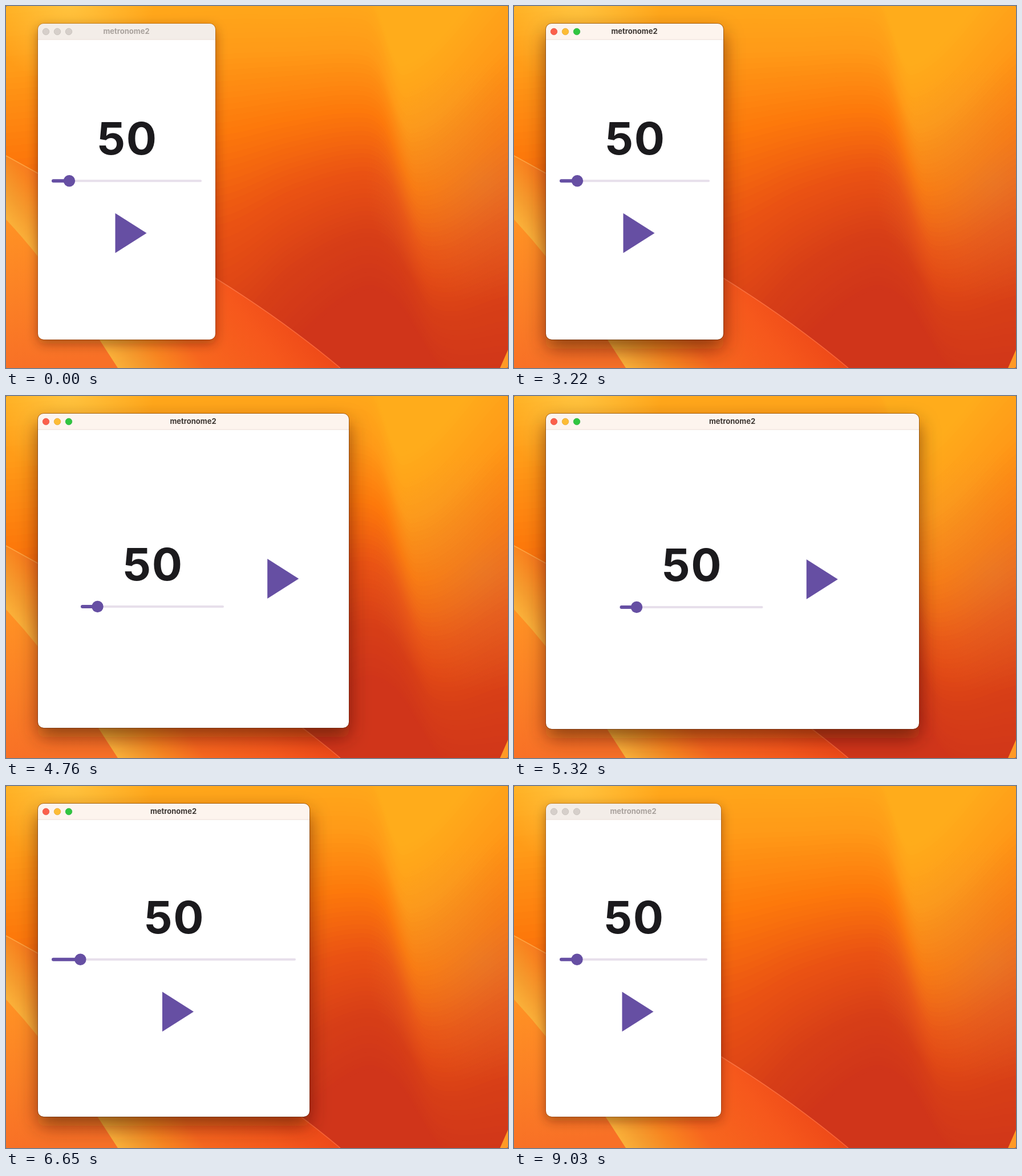
These frames come from a looping animation (880 by 636 pixels, 9.1 s). An HTML page:

```html
<!DOCTYPE html>
<html lang="en">
<head>
<meta charset="utf-8">
<title>metronome2</title>
<style>
  html, body { margin: 0; width: 100%; height: 100%; overflow: hidden; background: #7a3c14; }
  svg { display: block; width: 880px; height: 636px; }
  text { font-family: Inter, "Liberation Sans", sans-serif; font-weight: 700; text-anchor: middle; font-optical-sizing: none; }
</style>
</head>
<body>
<svg viewBox="0 0 880 636">
  <defs>
    <clipPath id="screen"><rect width="880" height="636" rx="3"/></clipPath>
    <linearGradient id="sheet" gradientUnits="userSpaceOnUse" x1="0" y1="375" x2="250" y2="188">
      <stop offset="0" stop-color="#fab13a"/>
      <stop offset=".1" stop-color="#f59c2e"/>
      <stop offset=".22" stop-color="#f88520"/>
      <stop offset=".4" stop-color="#f7661e"/>
      <stop offset=".74" stop-color="#f6581c"/>
      <stop offset="1" stop-color="#ee4918"/>
    </linearGradient>
    <linearGradient id="fold" gradientUnits="userSpaceOnUse" x1="0" y1="380" x2="40" y2="636">
      <stop offset="0" stop-color="#ff9224"/>
      <stop offset="1" stop-color="#f87026"/>
    </linearGradient>
    <linearGradient id="rim" gradientUnits="userSpaceOnUse" x1="0" y1="0" x2="586" y2="0">
      <stop offset="0" stop-color="#ffb04a"/>
      <stop offset=".65" stop-color="#ff7a48"/>
      <stop offset="1" stop-color="#ff6a3c"/>
    </linearGradient>
    <radialGradient id="glow" gradientUnits="userSpaceOnUse" cx="110" cy="-10" r="150">
      <stop offset="0" stop-color="#ffd050" stop-opacity=".7"/>
      <stop offset="1" stop-color="#ffd050" stop-opacity="0"/>
    </radialGradient>
    <radialGradient id="haze" gradientUnits="userSpaceOnUse" cx="840" cy="310" r="210">
      <stop offset="0" stop-color="#d8904c" stop-opacity=".34"/>
      <stop offset="1" stop-color="#d8904c" stop-opacity="0"/>
    </radialGradient>
    <filter id="wideBlur" filterUnits="userSpaceOnUse" x="-80" y="-80" width="1040" height="800">
      <feGaussianBlur stdDeviation="17"/>
    </filter>
    <filter id="tightBlur" filterUnits="userSpaceOnUse" x="-80" y="-80" width="1040" height="800">
      <feGaussianBlur stdDeviation="10"/>
    </filter>
  </defs>
  <g clip-path="url(#screen)">
    <rect width="880" height="636" fill="#ffac1b"/>
    <g id="dunes"></g>
    <rect width="880" height="636" fill="url(#haze)"/>
    <rect width="880" height="300" fill="url(#glow)"/>
    <path d="M0 263L56 294Q230 388 367 478Q490 555 586 636H0Z" fill="url(#sheet)"/>
    <path d="M0 263L56 294Q230 388 367 478Q490 555 586 636" fill="none" stroke="url(#rim)" stroke-width="1.6" stroke-opacity=".8"/>
    <path d="M0 375Q29 406 56 440Q120 520 165 588L196 636H0Z" fill="url(#fold)"/>
    <path d="M866 636Q873 620 880 604V636Z" fill="#ff9a26"/>

    <rect id="wideShadow" x="56" y="47" rx="10" fill="#3a1400" fill-opacity=".56" filter="url(#wideBlur)"/>
    <rect id="tightShadow" x="56" y="38" rx="10" fill="#3a1400" fill-opacity=".42" filter="url(#tightBlur)"/>
    <rect id="panel" x="56" y="31" rx="10" fill="#fff"/>
    <path id="bar"/>
    <path id="divider" stroke="#ebddd6"/>
    <rect id="outline" x="55.5" y="30.5" rx="10.5" fill="none" stroke="#5a2a10"/>
    <g id="lights" stroke-width=".7">
      <circle cx="70" cy="45" r="5.75"/>
      <circle cx="90" cy="45" r="5.75"/>
      <circle cx="110" cy="45" r="5.75"/>
    </g>
    <text id="title" y="49" font-size="13">metronome2</text>

    <text id="tempo" font-size="79" letter-spacing="1.5" fill="#1b1a1d">50</text>
    <path id="track" stroke="#e7dfeb" stroke-width="4" stroke-linecap="round"/>
    <path id="filled" stroke="#664fa3" stroke-width="6" stroke-linecap="round"/>
    <circle id="thumb" r="10.2" fill="#664fa3"/>
    <path id="play" d="M-20-35V35L35 0Z" fill="#664fa3"/>
  </g>
</svg>
<script>
const LOOP = 9100, STEP = 70;
const LEFT = 56, TOP = 31, CONTENT_TOP = 59;
const FOCUS_ON = 3220, FOCUS_OFF = 8680;
const $ = id => document.getElementById(id);
const mix = (a, b, k) => a + (b - a) * k;

function set(id, attrs) {
  for (const name in attrs) $(id).setAttribute(name, attrs[name]);
}

// Hermite segments through the points, closed below the stage.
function smoothPath(points) {
  const last = points.length - 1;
  const slope = i => {
    const a = points[Math.max(i - 1, 0)], b = points[Math.min(i + 1, last)];
    return (b[1] - a[1]) / (b[0] - a[0]);
  };
  let d = `M${points[0]}`;
  for (let i = 0; i < last; i++) {
    const [x0, y0] = points[i], [x1, y1] = points[i + 1], h = (x1 - x0) / 3;
    d += `C${x0 + h} ${y0 + h * slope(i)} ${x1 - h} ${y1 - h * slope(i + 1)} ${x1} ${y1}`;
  }
  return d + "V900H0Z";
}

// One wallpaper contour: a hill cresting at height p, a steep drop, a valley, a rise.
function contour(p) {
  const sag = p * p / 1000;
  return [
    [0, p + 30 + 1.5 * sag],
    [380, p + 1.1 * sag],
    [500, p + 0.4 * sag],
    [620, p],
    [645 + 0.08 * p, p + 20],
    [700 + 0.13 * p, p + 138],
    [880, 1.4 * p - 40]
  ];
}

function paintDunes() {
  const ramp = ["ffac1b", "ff9b18", "fd790b", "ea5213", "d73e17", "cf341a"]
    .map(hex => hex.match(/../g).map(c => parseInt(c, 16)));
  const CREST = -40, SPACING = 110, BANDS = 14;
  let markup = "";
  for (let i = 0; i < (ramp.length - 1) * BANDS; i++) {
    const n = Math.floor(i / BANDS), k = i / BANDS - n;
    const color = ramp[n].map((c, j) => Math.round(mix(c, ramp[n + 1][j], k)));
    markup += `<path fill="rgb(${color})" d="${smoothPath(contour(CREST + SPACING * (n + k)))}"/>`;
  }
  $("dunes").innerHTML = markup;
}

// Window drag: time, right edge, bottom edge.
const drag = [
  [3430, 367, 586], [3990, 506, 585], [4760, 601, 583], [5635, 742, 586],
  [6090, 690, 588], [7210, 392, 573], [7700, 363, 581]
];

// Monotone cubic interpolation of one column of the drag path.
function dragValue(t, col) {
  const last = drag.length - 1;
  if (t <= drag[0][0]) return drag[0][col];
  if (t >= drag[last][0]) return drag[last][col];
  const rate = i => (drag[i + 1][col] - drag[i][col]) / (drag[i + 1][0] - drag[i][0]);
  const tangent = i => {
    if (i === 0 || i === last) return 0;
    const a = rate(i - 1), b = rate(i);
    return a * b > 0 ? 2 * a * b / (a + b) : 0;
  };
  let i = 0;
  while (t >= drag[i + 1][0]) i++;
  const h = drag[i + 1][0] - drag[i][0];
  const u = (t - drag[i][0]) / h, v = 1 - u;
  return drag[i][col] * (1 + 2 * u) * v * v + h * tangent(i) * u * v * v
    + drag[i + 1][col] * u * u * (3 - 2 * u) - h * tangent(i + 1) * u * u * v;
}

function drawChrome(right, bottom, active) {
  const width = right - LEFT, height = bottom - TOP;
  set("wideShadow", { width, height, visibility: active ? "visible" : "hidden" });
  set("tightShadow", { width, height, visibility: active ? "hidden" : "visible" });
  set("panel", { width, height });
  set("outline", { width: width + 1, height: height + 1, "stroke-opacity": active ? .5 : .3 });
  set("bar", {
    d: `M${LEFT} 59V41a10 10 0 0 1 10-10H${right - 10}a10 10 0 0 1 10 10V59Z`,
    fill: active ? "#fdf4ee" : "#f3ede8"
  });
  set("divider", { d: `M${LEFT} 59H${right}` });
  set("title", { x: (LEFT + right) / 2 - .5, fill: active ? "#3d3733" : "#a8a19c" });
  const colors = ["#fb5f4b", "#fdbc35", "#2fc640"], rims = ["#e2503f", "#e0a32c", "#27ad35"];
  [...$("lights").children].forEach((light, i) => {
    light.setAttribute("fill", active ? colors[i] : "#d6cfca");
    light.setAttribute("stroke", active ? rims[i] : "#c1bab5");
  });
}

function drawContent(right, bottom) {
  const cx = (LEFT + right) / 2, cy = (CONTENT_TOP + bottom) / 2;
  const landscape = right - LEFT > bottom - CONTENT_TOP;
  const from = landscape ? cx - 197.5 : LEFT + 24;
  const to = landscape ? cx + 53.5 : right - 24;
  const y = landscape ? cy + 49 : cy - 15.2;
  const thumbX = mix(from, to, 20 / 170);
  set("tempo", { x: (from + to) / 2 + 1.2, y: y - 46 });
  set("track", { d: `M${thumbX} ${y}H${to - 2}` });
  set("filled", { d: `M${from + 3} ${y}H${thumbX}` });
  set("thumb", { cx: thumbX, cy: y });
  set("play", { transform: `translate(${landscape ? cx + 149.7 : cx} ${landscape ? cy : cy + 76.5})` });
}

function render(now) {
  const t = Math.floor((now % LOOP) / STEP) * STEP;
  const right = Math.round(dragValue(t, 1)), bottom = Math.round(dragValue(t, 2));
  drawChrome(right, bottom, t >= FOCUS_ON && t < FOCUS_OFF);
  drawContent(right, bottom);
}

function tick() {
  render(performance.now());
  requestAnimationFrame(tick);
}

paintDunes();
tick();
</script>
</body>
</html>
```
